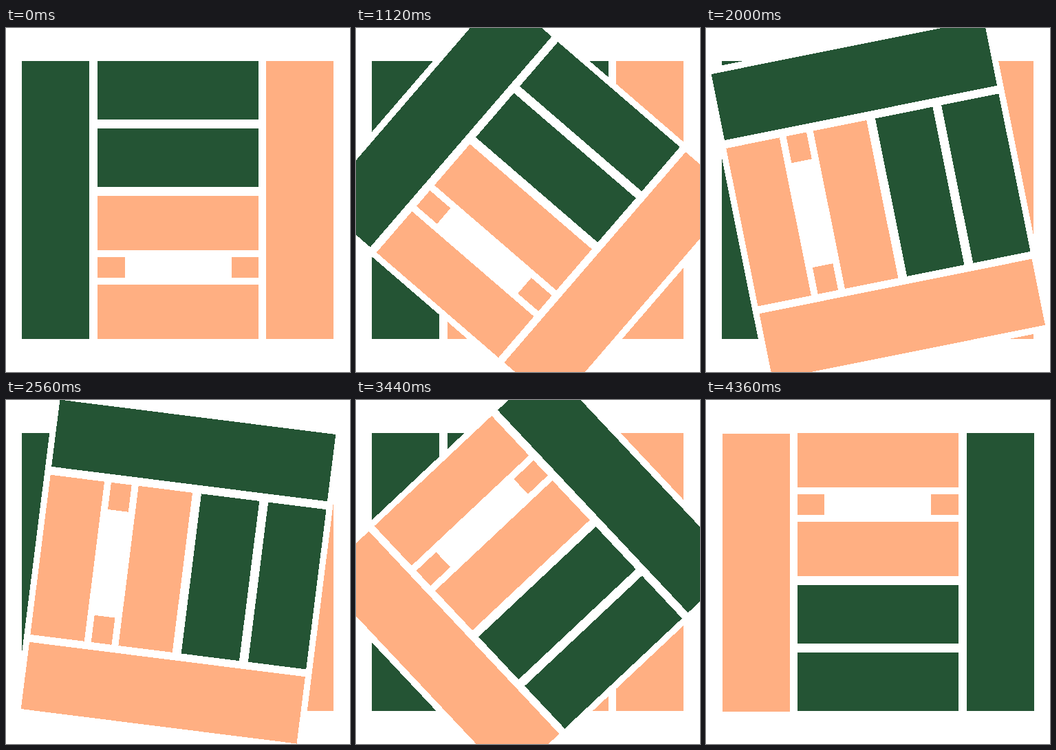
These frames come from a looping animation (500 px wide and 500 px high, 4.84 s). An HTML page:

```html
<!DOCTYPE html>
<html lang="en">
<head>
<meta charset="utf-8">
<title>Turning blocks</title>
<style>
  html, body { margin: 0; width: 100%; height: 100%; overflow: hidden; background: #fff; }
  svg { display: block; width: 100vw; height: 100vh; }
  rect { shape-rendering: crispEdges; }
  .green { fill: #245434; }
  .peach { fill: #ffaf82; }
</style>
</head>
<body>
<svg viewBox="0 0 500 500">
  <defs>
    <g id="blocks" transform="translate(0 -0.45)">
      <g class="green">
        <rect x="23" y="48" width="98" height="404"/>
        <rect x="133" y="48" width="234" height="85"/>
        <rect x="133" y="146" width="234" height="85"/>
      </g>
      <g class="peach">
        <rect x="133" y="244" width="234" height="79"/>
        <rect x="133" y="333" width="39.5" height="30"/>
        <rect x="327.5" y="333" width="39.5" height="30"/>
        <rect x="133" y="373" width="234" height="79"/>
        <rect x="378" y="48" width="98" height="404"/>
      </g>
    </g>
  </defs>
  <use href="#blocks"/>
  <g id="spinner">
    <rect x="13.5" y="38.5" width="472" height="422" fill="#fff"/>
    <use href="#blocks"/>
  </g>
</svg>
<script>
  const STEP = 40, LOOP = 4840, TURN_END = 4360;
  const spinner = document.getElementById('spinner');

  // Two quarter turns; each speeds up over `ramp` steps, then keeps `rate` degrees per step.
  const first = { start: 0, rate: 1.7225, lag: 1.15, ramp: 13 };
  const second = { start: 56.6, rate: 1.878, lag: 1.25, ramp: 13.5 };

  function quarter({ start, rate, lag, ramp }, step) {
    const n = step - start;
    const m = Math.min(n, ramp);
    return Math.min(90, rate * n - lag * (m - m * m / (2 * ramp)));
  }

  function angleAt(ms) {
    const step = Math.floor(Math.min(ms, TURN_END) / STEP);
    return step < second.start ? quarter(first, step) : 90 + quarter(second, step);
  }

  const origin = performance.now();

  function draw(now) {
    const ms = Math.max(0, now - origin) % LOOP;
    spinner.setAttribute('transform', `rotate(${angleAt(ms).toFixed(3)} 250 250)`);
    requestAnimationFrame(draw);
  }
  draw(origin);
</script>
</body>
</html>
```
